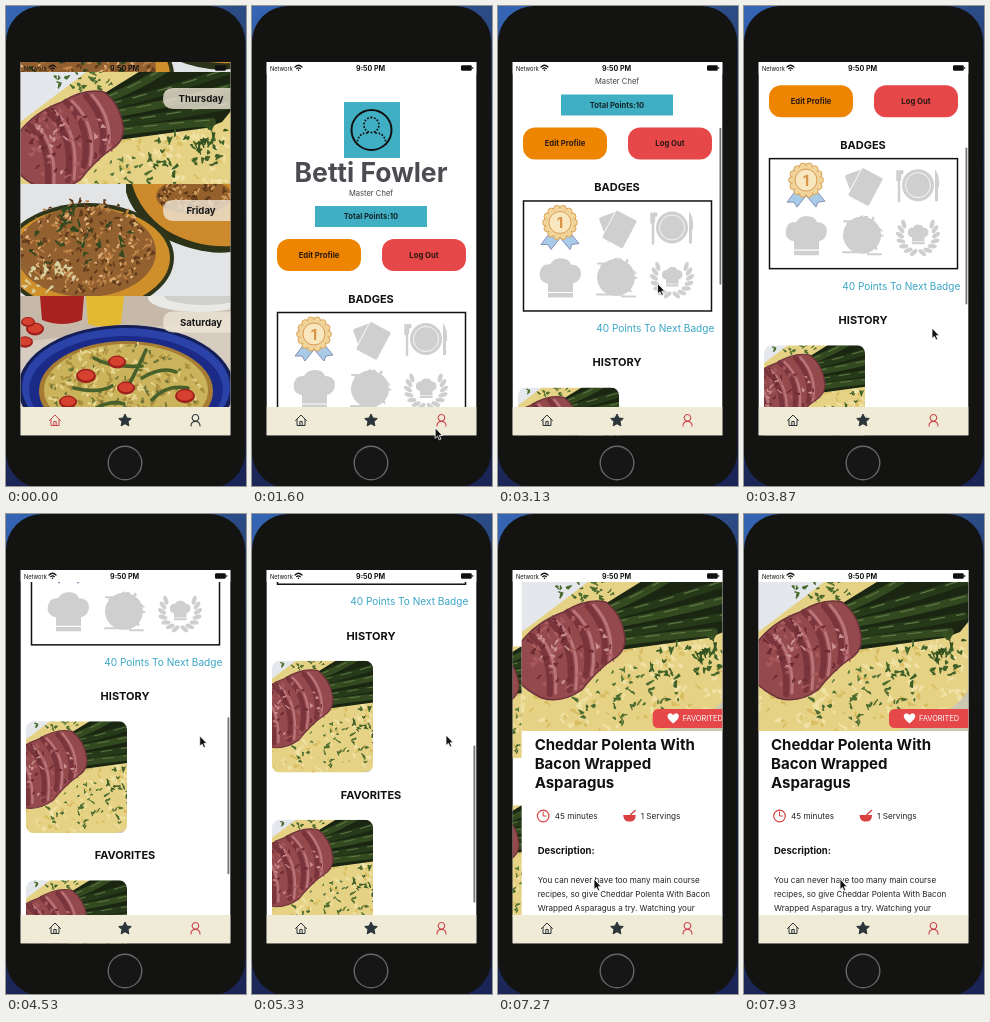
An HTML page that plays this animation: 240x480 px, repeating every 8 s.

```html
<!DOCTYPE html>
<html lang="en">
<head>
<meta charset="utf-8">
<title>Recipe app</title>
<style>
html, body { margin: 0; width: 100%; height: 100%; overflow: hidden; background: #131313; }
svg { display: block; }
text { font-family: Inter, Roboto, sans-serif; }
.b { font-weight: 700; }
.mid { text-anchor: middle; }
</style>
</head>
<body>
<svg id="stage" width="240" height="480" viewBox="0 0 240 480"></svg>
<script>
let seed = 7;
const rnd = () => (seed = (seed * 16807) % 2147483647) / 2147483647;
const between = (a, b) => a + (b - a) * rnd();

// Small irregular leaves or crumbs scattered over an ellipse
function flecks(n, cx, cy, rx, ry, size, fill) {
  let d = '';
  for (let i = 0; i < n; i++) {
    const a = rnd() * 2 * Math.PI, r = Math.sqrt(rnd());
    const s = () => between(-size, size).toFixed(1);
    d += `M${(cx + rx * r * Math.cos(a)).toFixed(1)} ${(cy + ry * r * Math.sin(a)).toFixed(1)}`
       + `q${s()} ${s()} ${s()} ${s()}q${s()} ${s()} ${s()} ${s()}z`;
  }
  return `<path d="${d}" fill="${fill}" stroke="${fill}" stroke-width="1.2" stroke-linejoin="round"/>`;
}
const line = (d, color, w, extra = '') =>
  `<path d="${d}" fill="none" stroke="${color}" stroke-width="${w}" stroke-linecap="round" stroke-linejoin="round" ${extra}/>`;
const box = (x, y, w, h, fill, rx = 0, extra = '') =>
  `<rect x="${x}" y="${y}" width="${w}" height="${h}" rx="${rx}" fill="${fill}" ${extra}/>`;
const oval = (cx, cy, rx, ry, fill, extra = '') =>
  `<ellipse cx="${cx}" cy="${cy}" rx="${rx}" ry="${ry}" fill="${fill}" ${extra}/>`;
const shape = (d, fill, extra = '') => `<path d="${d}" fill="${fill}" ${extra}/>`;
const text = (s, x, y, size, fill, cls = '') =>
  `<text x="${x}" y="${y}" font-size="${size}" fill="${fill}" class="${cls}">${s}</text>`;
const at = (x, y, body) => `<g transform="translate(${x} ${y})">${body}</g>`;
// A nested svg crops the picture to its frame
const photo = (id, x, y, w, h, view = `0 0 ${w} ${h}`) =>
  `<svg x="${x}" y="${y}" width="${w}" height="${h}" viewBox="${view}"><use href="#${id}"/></svg>`;

function polenta() {
  const spears = ['M84 28Q120 14 150 -6', 'M88 34Q140 22 216 -4', 'M92 42Q150 32 216 14', 'M96 52Q150 44 206 34', 'M98 60Q140 54 192 50'];
  const bacon = 'M-2 62Q14 40 42 30Q64 16 84 20Q100 32 103 54Q105 70 90 78Q74 90 60 108Q40 122 20 116Q4 108 -2 100Z';
  return box(0, 0, 211, 149, '#e6d285')
    + flecks(110, 105, 100, 125, 60, 5, '#f0e2a4') + flecks(60, 110, 110, 120, 50, 4, '#d9bd62')
    + shape('M0 0H66Q40 20 0 50Z', '#e4e8ec')
    + shape('M211 149V108Q190 138 140 149Z', '#cdc8b2')
    + flecks(24, 66, 10, 34, 12, 3.5, '#4b6b2e')
    + shape('M80 24L122 -2H215V34L202 50L186 56L98 68Z', '#1a2612')
    + spears.map((d, i) => line(d, i % 2 ? '#263a1a' : '#33491f', 8)
      + line(d, '#5c7440', 1.3, 'stroke-dasharray="14 12" transform="translate(0 -2)"')).join('')
    + flecks(34, 164, 82, 44, 22, 4.5, '#3f6028') + flecks(30, 110, 124, 60, 22, 4, '#4c6c30')
    + flecks(14, 188, 64, 20, 14, 4, '#34511f') + flecks(14, 98, 92, 30, 14, 3, '#58783a')
    + shape(bacon, '#94494d')
    + ['M10 54Q30 72 28 112', 'M28 40Q54 60 48 108', 'M46 30Q72 54 64 94', 'M66 24Q88 48 82 80']
      .map(d => line(d, '#7a343c', 6) + line(d, '#b9757a', 3, 'transform="translate(6 -1)"')).join('')
    + flecks(40, 50, 70, 44, 38, 4, '#a85a5c') + flecks(26, 48, 70, 42, 36, 3.5, '#6d2c33')
    + flecks(16, 52, 66, 40, 34, 3, '#cb9190')
    + line(bacon, '#6d333a', 1.5);
}

function squash() {
  return box(0, 0, 211, 112, '#e2e4e6')
    + shape('M106 0H211V68Q180 72 140 52Q112 30 106 8Z', '#2c3318')
    + shape('M112 0H211V62Q176 64 146 46Q120 28 112 0Z', '#cd8a2c')
    + oval(174, 12, 38, 18, '#94602c') + flecks(50, 176, 12, 38, 17, 3, '#5c391b') + flecks(40, 176, 12, 36, 16, 2.5, '#cf9a5a')
    + oval(68, 74, 86, 55, '#2f351a') + oval(68, 74, 82, 51, '#cf8f2b') + oval(66, 68, 70, 45, '#93602f')
    + flecks(130, 66, 62, 66, 46, 3, '#5f3a1b') + flecks(130, 66, 62, 66, 46, 2.5, '#bf8549')
    + flecks(70, 66, 62, 66, 44, 2, '#e0b47c') + flecks(18, 70, 60, 60, 36, 5, '#34481f')
    + flecks(10, 50, 30, 12, 14, 6, '#2f4a20') + flecks(22, 28, 94, 28, 14, 4, '#d8cfa0');
}

function quiche() {
  const slice = (x, y, r) => oval(x, y, r, r * .72, '#9c211c') + oval(x, y - .6, r * .8, r * .52, '#d5402f');
  return box(0, 0, 211, 112, '#d6ccc0') + shape('M0 46L211 22V0H0Z', '#c6b9aa')
    + oval(180, 2, 52, 14, '#e9e9e5') + oval(184, 0, 40, 9, '#cfd0cb')
    + shape('M20 0H64L62 24Q42 32 22 24Z', '#a8231f') + shape('M66 0H104L101 28Q84 33 68 28Z', '#e3b92f')
    + slice(15, 33, 9) + slice(5, 46, 8) + slice(8, 26, 7)
    + oval(106, 92, 108, 63, '#141f58') + oval(106, 91, 104, 59, '#2b42a8') + oval(106, 94, 97, 54, '#1a2a86')
    + oval(106, 95, 87, 50, '#a67c34') + oval(106, 94, 82, 46, '#cbb35c')
    + flecks(110, 106, 92, 78, 44, 4, '#a98f3f') + flecks(90, 106, 92, 78, 44, 3.5, '#e4d48c') + flecks(60, 106, 92, 76, 42, 2.5, '#6d7437')
    + ['M74 62Q90 72 122 70', 'M126 54Q116 76 106 94', 'M54 92Q78 98 92 90', 'M122 82Q142 70 156 76', 'M76 112Q92 104 104 108', 'M132 104Q146 88 168 92']
      .map(d => line(d, '#48602a', 3.6)).join('')
    + slice(66, 80, 10) + slice(97, 66, 9) + slice(106, 92, 9) + slice(165, 100, 10) + slice(48, 106, 9);
}

const GREY = '#cfcfcf';
const hat = shape('M-12 6Q-22 4 -20 -6Q-18 -14 -10 -13Q-6 -20 2 -19Q9 -19 11 -13Q20 -13 21 -5Q21 4 13 6V20H-12Z', GREY)
  + line('M-12 15H13', '#fff', 1.2);

function badges() {
  let petals = '', leaves = '';
  for (let i = 0; i < 14; i++)
    petals += `<circle cx="${14 * Math.cos(i * Math.PI / 7)}" cy="${14 * Math.sin(i * Math.PI / 7) - 5}" r="3.4"/>`;
  for (let i = 0; i < 7; i++)
    for (const s of [-1, 1])
      leaves += `<ellipse cx="0" cy="18" rx="2.2" ry="4.6" fill="${GREY}" transform="rotate(${s * (14 + i * 19)}) rotate(${s * 35} 0 18)"/>`;
  const medal = shape('M-9 4L-19 17L-12 17L-9 22L2 8Z M9 4L19 16L12 17L10 22L-2 8Z', '#a8cbe8', 'stroke="#8a8fb4" stroke-width="1"')
    + `<g fill="#f1d49a" stroke="#dba45c" stroke-width="1">${petals}</g>`
    + oval(0, -5, 14, 14, '#f1d49a') + oval(0, -5, 11, 11, '#f9e7c0', 'stroke="#d69a55" stroke-width="1"')
    + text('1', 0, .5, 15, '#d79449', 'b mid');
  const cards = `<g fill="${GREY}"><rect x="-13" y="-15" width="22" height="27" rx="2" transform="rotate(-20)"/>`
    + `<rect x="-8" y="-16" width="24" height="32" rx="2" transform="rotate(28)" stroke="#fff" stroke-width=".8"/></g>`;
  const dish = oval(0, 0, 16, 16, GREY) + oval(0, 0, 12.5, 12.5, 'none', 'stroke="#fff" stroke-width=".8"')
    + line('M-18 -14V-6M-20.5 -14V-5M-15.8 -14V-12M-19 -5V16', GREY, 2.4) + shape('M17 16V-16Q22 -10 21 2H20V16Z', GREY);
  const splat = oval(0, 0, 19, 18.5, GREY) + flecks(30, 0, 0, 19, 18, 3, GREY) + line('M-19 17H6M6 19H19M-18 -14H-6', GREY, 2);
  const wreath = leaves + `<g transform="scale(.5) translate(0 -2)">${hat}</g>`;
  return [medal, cards, dish, hat, splat, wreath]
    .map((b, i) => at(62 + i % 3 * 56, 333 + Math.floor(i / 3) * 50, b)).join('');
}

const dish = y => at(20, y, `<g clip-path="url(#card)">${photo('polenta', 0, 0, 101, 112, '26 8 128 141')}</g>`);
const button = (s, x, fill) => box(x, 233, 84, 32, fill, 12) + text(s, x + 42, 252, 7.7, '#2a1912', 'b mid');
const heading = (s, y) => text(s, 119, y, 11, '#111', 'b mid');
const day = (s, y) => shape(`M225 ${y}H167Q157 ${y} 157 ${y + 10.5}T167 ${y + 21}H225Z`, '#eee5d6', 'opacity=".8"')
  + text(s, 195, y + 14, 9.6, '#161616', 'b mid');

const home = box(14, 55, 211, 347, '#cfc7a8') + photo('squash', 14, 55, 211, 11, '0 60 211 11')
  + photo('polenta', 14, 66, 211, 112) + photo('squash', 14, 178, 211, 112) + photo('quiche', 14, 290, 211, 112)
  + day('Thursday', 82) + day('Friday', 194) + day('Saturday', 305.5);

const profile = box(92, 96, 56, 56, '#41afc3')
  + oval(119.5, 124, 20, 20, 'none', 'stroke="#111" stroke-width="2"')
  + line('M119.5 111.5a7.5 7.5 0 1 1 -.1 0M105 138Q106 127 115 127M124 127Q133 127 134 138', '#111', 1.9, 'stroke-dasharray=".1 3.2"')
  + text('Betti Fowler', 119, 175.5, 26.5, '#4b4c51', 'b mid')
  + text('Master Chef', 119, 189.5, 7.6, '#444', 'mid')
  + box(63, 200, 112, 21, '#41afc3') + text('Total Points:10', 119, 213.3, 7.6, '#10262b', 'b mid')
  + button('Edit Profile', 25, '#ee8500') + button('Log Out', 130, '#e64749')
  + heading('BADGES', 297) + box(25.5, 306.5, 188, 110, '#fff', 0, 'stroke="#111" stroke-width="1.5"') + badges()
  + `<text x="216.400" y="437.5" font-size="10.1" fill="#3aa5c4" text-anchor="end">40 Points To Next Badge</text>`
  + heading('HISTORY', 472) + dish(493) + heading('FAVORITES', 631) + dish(652);

const detail = box(14, 55, 211, 347, '#fff') + photo('polenta', 14, 68, 211, 149)
  + shape('M225 195H151Q145 195 145 201V208Q145 214 151 214H225Z', '#e64749')
  + shape('M165.500 209.5Q158.500 204 160 200.8Q162.500 197.5 165.500 201Q168.500 197.5 171 200.8Q172.500 204 165.500 209.5Z', '#fff')
  + text('FAVORITED', 175, 207.3, 7.4, '#fff')
  + ['Cheddar Polenta With', 'Bacon Wrapped', 'Asparagus'].map((s, i) => text(s, 27, 236 + 19 * i, 15, '#111', 'b')).join('')
  + oval(35.5, 302, 5.8, 5.8, 'none', 'stroke="#d8413f" stroke-width="1.2"') + line('M35.5 298V302H38.5', '#d8413f', 1)
  + text('45 minutes', 47, 305, 8.2, '#222') + text('1 Servings', 133, 305, 8.2, '#222')
  + shape('M115.500 301H128Q128 307 123 307.500H120.500Q116 307 115.500 301Z', '#d8413f') + line('M123 300.500L127.500 296.500', '#d8413f', 1.5)
  + text('Description:', 30, 340, 9.5, '#111', 'b')
  + ['You can never have too many main course', 'recipes, so give Cheddar Polenta With Bacon', 'Wrapped Asparagus a try. Watching your']
    .map((s, i) => text(s, 30, 369 + 14 * i, 8.1, '#222')).join('');

const status = text('Network', 18, 64.5, 5.7, '#111') + text('9:50 PM', 118.6, 64.5, 7.1, '#111', 'b mid')
  + line('M43 61Q46.500 57.500 50 61M44.600 62.700Q46.500 61 48.400 62.700', '#111', 1.2) + oval(46.5, 64.2, .8, .8, '#111')
  + box(209, 59.2, 10.8, 5.6, '#111', 1.4) + box(220.3, 61, .9, 2, '#111');

const tabs = box(14, 401, 211, 29, '#f0ebd7')
  + `<g id="homeTab">${line('M43.500 414.500L49 409L54.500 414.500M45 413.500V419.500H53V413.500M47.800 419.500V415.500H50.200V419.500', 'currentColor', 1)}</g>`
  + shape('M119 408l1.900 4 4.400.5-3.300 3 .9 4.400-3.900-2.200-3.900 2.200.9-4.400-3.300-3 4.400-.5z', '#2b3439', 'stroke="#2b3439" stroke-linejoin="round"')
  + `<g id="userTab">${line('M189.500 408.500a3.300 3.300 0 1 1 -.1 0M185 420Q185 415.500 189.500 415.500T194 420', 'currentColor', 1.1)}</g>`;

const $ = id => document.getElementById(id);
const picture = (id, body) => `<g id="${id}"><g filter="url(#soft)">${body}</g></g>`;
$('stage').innerHTML = `<defs>${picture('polenta', polenta())}${picture('squash', squash())}${picture('quiche', quiche())}
  <filter id="soft"><feGaussianBlur stdDeviation=".6"/></filter>
  <linearGradient id="desk" x2=".3" y2="1"><stop stop-color="#3566b6"/><stop offset=".5" stop-color="#24365f"/><stop offset="1" stop-color="#1a2456"/></linearGradient>
  <clipPath id="card"><rect width="101" height="112" rx="8"/></clipPath>
  <clipPath id="screen"><rect x="14.700" y="56" width="209.600" height="373.300"/></clipPath></defs>`
  + box(0, 0, 240, 480, 'url(#desk)') + box(0, 0, 239.3, 482, '#131312', 36)
  + oval(119, 457, 16.8, 16.8, '#161616', 'stroke="#66666a" stroke-width="1.4"')
  + `<g clip-path="url(#screen)">${box(14, 55, 211, 375, '#fff')}<g id="home">${home}</g>
    <g id="profile"><g id="content">${profile}</g><rect id="bar" x="221.500" width="1.800" height="157" rx=".9" fill="#444"/></g>
    <g id="detail">${detail}</g><g id="top">${box(14, 55, 211, 13, '#fff')}</g>${status}${tabs}</g>`
  + `<g id="cursor">${shape('M0 0V10.500L2.400 8.400L4 12L5.800 11.200L4.200 7.700H7.300Z', '#111', 'stroke="#fff" stroke-width=".8"')}</g>`;

const LOOP = 8000, TAP = 1330, PUSH = 6950;
const path = [[0, 246, 446], [700, 246, 446], [1130, 184, 421], [1700, 183, 422], [2130, 156, 355], [2400, 156, 355],
  [2850, 157, 279], [3100, 158, 275], [3700, 188, 322], [3880, 188, 322], [4350, 193, 224], [4600, 194, 221],
  [5750, 194, 221], [6600, 94, 350], [6850, 94, 350], [7250, 96, 365], [LOOP, 96, 365]];

function pointer(t) {
  const i = path.findIndex(p => p[0] > t), [a, x, y] = path[i - 1], [b, u, v] = path[i];
  const k = (t - a) / (b - a);
  return [x + (u - x) * k, y + (v - y) * k];
}
const glide = (from, to, ms, tau) => to + (from - to) * Math.exp(-ms / tau);

// Two drags, each followed by a decaying fling
function scrollAt(t, y) {
  if (t < 2400) return 0;
  if (t < 2850) return Math.max(0, 345 - y);
  if (t < 3880) return glide(66, 164, t - 2850, 450);
  if (t < 4350) return 154 + 322 - y;
  return glide(252, 361, t - 4350, 490);
}
const move = (id, x, y) => $(id).setAttribute('transform', `translate(${x.toFixed(2)} ${y.toFixed(2)})`);
const show = (id, on) => $(id).style.display = on ? '' : 'none';
const clamp = v => Math.min(1, Math.max(0, v));

function draw(now) {
  const t = now % LOOP, [x, y] = pointer(t), scroll = scrollAt(t, y);
  const push = 1 - (1 - clamp((t - PUSH) / 500)) ** 3;
  const tapped = t >= TAP;
  show('home', !tapped);
  show('profile', tapped && push < 1);
  show('detail', push > 0);
  show('top', tapped);
  $('homeTab').style.color = tapped ? '#2b3439' : '#c9434a';
  $('userTab').style.color = tapped ? '#c9434a' : '#2b3439';
  move('content', 0, -scroll);
  move('profile', -63 * push, 0);
  move('detail', 211 * (1 - push), 0);
  move('bar', 0, 69.5 + scroll * .468);
  $('bar').style.opacity = .75 * clamp((t - 2400) / 100) * clamp((6800 - t) / 350);
  move('cursor', x, y);
  requestAnimationFrame(draw);
}
draw(0);
</script>
</body>
</html>
```
